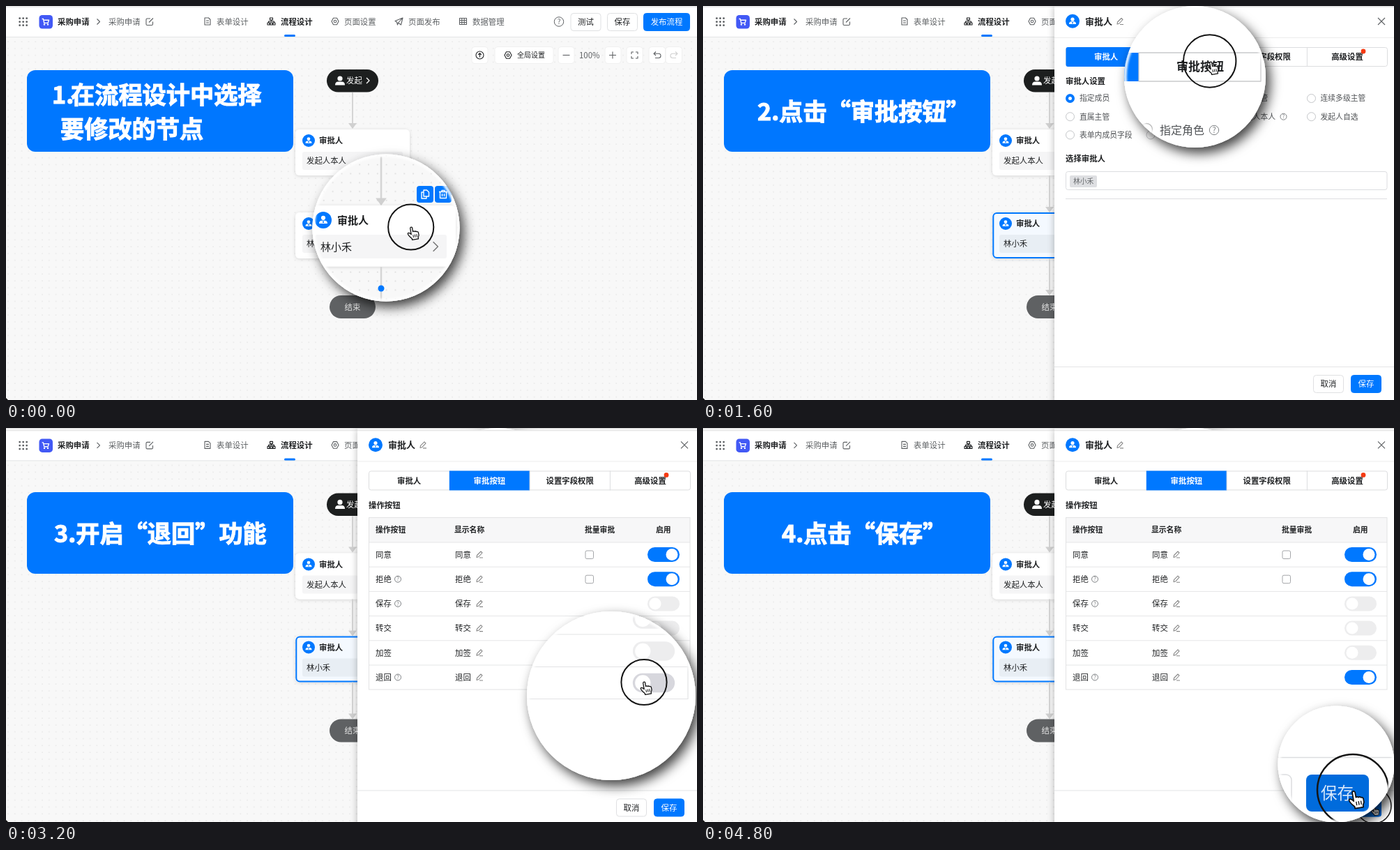
Recreate the animation shown at these times as an HTML page. Size 991 by 565 pixels, loop 6.4 s.

```html
<!DOCTYPE html>
<html lang="zh-CN">
<head>
<meta charset="utf-8">
<style>
html, body { margin: 0; width: 100%; height: 100%; overflow: hidden; background: #f8f8f8 }
svg { display: block; width: 991px; height: 565px }
text { font-family: "Noto Sans CJK SC", "Noto Sans CJK", sans-serif; white-space: pre }
.title text { stroke: #fff; stroke-width: 1.1px }
</style>
</head>
<body>
<svg id="stage" viewBox="0 0 991 565" lang="zh-CN"></svg>
<script>
const BLUE = '#0078ff', INK = '#1f2123', GREY = '#5d6063', PERSON = '林小禾', DY = 2.4;

const text = (x, y, s, c = INK, w = 400, z = 11.4, a = 'start') =>
  `<text x="${x}" y="${y + z * .37}" fill="${c}" font-weight="${w}" font-size="${z}" text-anchor="${a}">${s}</text>`;
const box = (x, y, w, h, r = 0, f = '#fff', s = 'none', more = '') =>
  `<rect x="${x}" y="${y}" width="${w}" height="${h}" rx="${r}" fill="${f}" stroke="${s}" ${more}/>`;
const dot = (x, y, r, f, s = 'none', w = 1) =>
  `<circle cx="${x}" cy="${y}" r="${r}" fill="${f}" stroke="${s}" stroke-width="${w}"/>`;
const path = (d, s = '#ddd', w = 1, f = 'none') =>
  `<path d="${d}" stroke="${s}" stroke-width="${w}" fill="${f}" stroke-linejoin="round"/>`;
const at = (x, y, s, k = 1) => `<g transform="translate(${x} ${y}) scale(${k})">${s}</g>`;
const icon = (x, y, d, c = GREY, k = 1, w = 1.1) => at(x, y, path(d, c, w), k);

const CHEVRON = 'M-2-4L2 0L-2 4';
const PENCIL = 'M-4 4L-3.500 1L2-4.500L4-2.500L-1 3ZM0 4.500H5';
const EDIT = 'M1-4.500H-3.500Q-5-4.500-5-3V3.500Q-5 5-3.500 5H3Q4.500 5 4.500 3.500V0M-1 1L5-5';
const DOC = 'M-4-5H1.500L4-2.500V5H-4ZM-2-1H2M-2 2H2';
const TREE = 'M-2-5H2V-2H-2ZM0-2V0M-4 2V0H4V2M-5.500 2H-2.500V5H-5.500ZM-1.500 2H1.500V5H-1.500ZM2.500 2H5.500V5H2.500Z';
const GEAR = 'M-2.500-4.800H2.500L5 0L2.500 4.800H-2.500L-5 0ZM1.800 0A1.800 1.800 0 1 1-1.800 0A1.800 1.800 0 1 1 1.800 0';
const PLANE = 'M-5.500-.5L5.500-5L3 5L-1 2L-2 5L-3 1ZM-1 2L5.500-5';
const GRID = 'M-5-4.500H5V4.500H-5ZM-5-1.500H5M-5 1.500H5M-1.700-4.500V4.500M1.700-4.500V4.500';
const UP = 'M5.500 0A5.500 5.500 0 1 1-5.500 0A5.500 5.500 0 1 1 5.500 0M0 3V-2.500M-2.300-.5L0-2.800L2.300-.5';
const FULL = 'M-4.500-1.500V-4.500H-1.500M1.500-4.500H4.500V-1.500M4.500 1.500V4.500H1.500M-1.500 4.500H-4.500V1.500';
const UNDO = 'M-2-5L-5-2.200L-2 .5M-5-2.200H2Q5-2.200 5 1Q5 4 2 4H-3';
const COPY = 'M-2-6H2.500L5.500-3V3H-2ZM-2-3H-5V6H2V3';
const BIN = 'M-6-3.500H6M-2-3.500V-5.500H2V-3.500M-4.500-3.500V5.500H4.500V-3.500M-1.500-1V3M1.500-1V3';

const help = (x, y, r = 4.5, z = 7.5, c = '#7d8083') => dot(x, y, r, 'none', c) + text(x, y, '?', c, 400, z, 'middle');
const bust = (x, y, k) => at(x, y, dot(0, -3, 3.6, '#fff') + path('M-7 6.500Q-7 1.500-2.500 1.500H2.500Q7 1.500 7 6.500Z', 'none', 0, '#fff'), k);
const avatar = (x, y, r) => dot(x, y, r, BLUE) + bust(x, y - r * .05, r / 14) + path(`M${x} ${y + r * .12}v${r * .22}`, BLUE, r * .14);
const arrow = (x, y1, y2, k = 1) =>
  path(`M${x} ${y1}V${y2 - 6}`, '#d5d5d5', 2 * k) + path(`M${x - 6 * k} ${y2 - 8 * k}h${12 * k}l${-6 * k} ${8 * k}z`, 'none', 0, '#d0d0d0');
const hand = (x, y, k = 1) => at(x, y, `<g transform="rotate(-10)">` +
  path('M-3 9V7Q-8.500 1-7.500-1.500Q-5.500-2.500-3 1V-7.500Q-3-9.300-1.500-9.300Q0-9.300 0-7.500V-2.500Q1.500-3.500 2.700-2Q4-3 5.300-1.400Q7.500-1.600 7.500 .7V4L6 7V9Z', '#111', 1.3, '#fff') +
  path('M-.5 2V6M2 2V6M4.500 2V6', '#111', 1) + '</g>', k);
const pointer = (x, y, r, hx, hy, k = 1, w = 2) => dot(x, y, r, 'none', '#151515', w) + hand(hx, hy, k);
const toggle = (x, y, on, k = 1, off = '#ededee') =>
  box(x - 23 * k, y - 10.5 * k, 46 * k, 21 * k, 10.5 * k, on ? BLUE : off) + dot(x + (on ? 12 : -12) * k, y, 8.5 * k, '#fff');
const button = (x, y, w, s, main) =>
  box(x + .5, y + .5, w - 1, 25, 4, main || '#fff', main || '#dfe0e2') + text(x + w / 2, y + 13, s, main ? '#fff' : INK, 400, 11.4, 'middle');

let lensId = 0;
const lens = (x, y, r, inner) => {
  const id = 'lens' + lensId++;
  return `<clipPath id="${id}"><circle cx="${x}" cy="${y}" r="${r}"/></clipPath>
    <g filter="url(#deep)">${dot(x, y, r, '#fff')}</g>
    <g clip-path="url(#${id})">${inner}<g filter="url(#soft)">${dot(x, y, r - 1.5, 'none', '#fff', 4)}</g></g>`;
};

const card = (y, name, on) =>
  `<g filter="url(#light)">${box(415, y, 164, 66, 6, on ? '#f4f9ff' : '#fff')}</g>` +
  (on ? box(416.3, y + 1, 162, 64, 5, 'none', BLUE, 'stroke-width="2"') : '') +
  avatar(434, y + 16, 9) + text(449, y + 16, '审批人', INK, 700) +
  box(425, y + 32, 144, 26, 3, on ? '#e8eef4' : '#f5f5f6') + text(431, y + 45, name);

const tool = (x, w) => box(x, 58.5, w, 24, 4, '#fff', '#f0f0f0');

function base(selected) {
  let s = box(0, 0, 991, 570, 0, '#f8f8f8') + box(0, 44, 991, 525, 0, 'url(#dots)') +
    box(0, 0, 991, 44) + path('M0 1H991', '#e2e2e2', 1.5) + path('M0 44.500H991', '#e4e5e6');
  for (let i = 0; i < 9; i++) s += dot(19.7 + i % 3 * 5, 17.7 + (i / 3 | 0) * 5, 1.4, GREY);
  s += box(47.5, 13, 19.5, 19.5, 4.5, '#4259f5') +
    icon(57, 22.5, 'M-6-4.500H-4L-2.500 2H3.500L5-2.500H-3.500', '#fff', .9, 1.5) + dot(55, 26.5, 1.2, '#fff') + dot(60, 26.5, 1.2, '#fff') +
    text(74, 22.5, '采购申请', INK, 700) + icon(132.5, 22.5, CHEVRON) + text(147, 22.5, '采购申请', GREY) + icon(206, 22.5, EDIT);
  const tabs = [[289, DOC, 302, '表单设计'], [380.5, TREE, 394, '流程设计'], [472, GEAR, 485, '页面设置'], [563.5, PLANE, 577, '页面发布'], [655.5, GRID, 669, '数据管理']];
  tabs.forEach(([x, d, tx, name], i) => s += icon(x, 22, d, i == 1 ? INK : GREY) + text(tx, 22.5, name, i == 1 ? INK : GREY, i == 1 ? 700 : 400));
  s += box(399, 41, 16, 3, 1.5, BLUE) + help(793, 22.5, 6.7, 10, GREY) +
    button(809.5, 10, 44, '测试') + button(862, 10, 44, '保存') + button(914, 10, 67, '发布流程', BLUE);
  s += tool(668, 23) + icon(679.5, 70.5, UP, INK) + tool(701, 84) + icon(720, 70.5, GEAR, INK) + text(733, 70.5, '全局设置', INK, 400, 10) +
    tool(792, 23) + icon(803.5, 70.5, 'M-5 0H5') + text(822, 70.5, '100%', GREY) + tool(859, 23) + icon(870, 70.5, 'M-5 0H5M0-5V5') +
    tool(890, 23) + icon(901.5, 70.5, FULL) + tool(922, 23.5) + icon(934, 70.5, UNDO) + tool(946, 23.5) +
    `<g transform="translate(958 70.500) scale(-1 1)">${path(UNDO, '#d0d0d0', 1.1)}</g>`;
  s += box(460, 91, 74, 32.5, 16.2, '#1d1f1f') + bust(479, 107, 1) + text(488, 107, '发起', '#fff') + icon(519, 107, CHEVRON, '#fff', 1, 1.3) +
    arrow(497, 124, 176) + card(177, '发起人本人') + arrow(497, 243, 296) + card(296, PERSON, selected) + arrow(497, 362, 415) +
    box(464, 415, 66, 33, 16.5, '#5f6163') + text(497, 431.7, '结束', '#e6e6e6', 400, 11.4, 'middle');
  return s;
}

function panel(active) {
  let s = `<g filter="url(#side)">${box(504, 1, 500, 580)}</g>` + path('M504 1H991', '#e2e2e2', 1.5) +
    avatar(530, 21.8, 10) + text(548, 21.8, '审批人', INK, 700, 13) + icon(598, 22, PENCIL, '#888') +
    icon(973, 22, 'M-5-5L5 5M5-5L-5 5') + path('M504 45.500H991', '#ececec');
  s += box(520.5, 59.5, 461, 27, 3, '#fff', '#dcdddf');
  ['审批人', '审批按钮', '设置字段权限', '高级设置'].forEach((name, i) => {
    const x = 520.5 + i * 115.3, on = i == active;
    s += (on ? box(x, 59, 115.3, 28, i ? 0 : 3, BLUE) : i ? path(`M${x} 59V87`, '#dcdddf') : '') +
      text(x + 57.6, 73, name, on ? '#fff' : INK, 700, 11.4, 'middle');
  });
  return s + dot(947, 65, 3.4, '#f53a12') + path('M504 517.500H991', '#e4e5e6') +
    button(875, 529, 44, '取消') + button(929, 529, 44, '保存', BLUE);
}

function members() {
  let s = text(520, 108, '审批人设置', INK, 700);
  const cols = [[526.5, 540, ['指定成员', '直属主管', '表单内成员字段']], [642, 655, ['指定角色', '部门主管', '部门字段']],
    [754, 767, ['多级主管', '发起人本人']], [872.5, 885.5, ['连续多级主管', '发起人自选']]];
  cols.forEach(([x, tx, names], c) => names.forEach((name, r) => {
    const y = 132.5 + r * 26.2, on = !c && !r;
    s += dot(x, y, on ? 4.5 : 6, '#fff', on ? BLUE : '#c4c6c9', on ? 4 : 1) + text(tx, y, name, '#505356', 400, 10.8);
  }));
  return s + help(832.5, 158.7) + text(520, 219, '选择审批人', INK, 700) + box(520.5, 237.5, 460.5, 26, 3, '#fff', '#dcdde0') +
    box(526, 243, 39, 17, 2, '#dedfe2') + text(531, 251.5, PERSON, '#65686b', 400, 9.8) + path('M520 276.500H981', '#dedfe1');
}

function table(lastOn) {
  let s = text(520, 110.5, '操作按钮', INK, 700) + box(520.5, 128.5, 460.5, 35.5, 0, '#f7f7f8');
  [[530, '操作按钮'], [643, '显示名称'], [830, '批量审批'], [932, '启用']].forEach(([x, h]) => s += text(x, 146.5, h, INK, 700, 10.8));
  ['同意', '拒绝', '保存', '转交', '加签', '退回'].forEach((name, i) => {
    const y = 181.5 + i * 35.2;
    s += path(`M520 ${y - 17.5}H981`, '#e5e6e7') + text(530, y, name) + text(644, y, name) + icon(679, y, PENCIL, '#888') +
      (i == 1 || i == 2 || i == 5 ? help(562, y) : '') +
      (i < 2 ? box(831, y - 5.5, 11.5, 11.5, 2, '#fff', '#a4a6a9') : '') + toggle(943, y, i < 2 || i == 5 && lastOn);
  });
  return s + box(520.5, 128.5, 460.5, 246.5, 0, 'none', '#e2e3e4');
}

const banner = (...lines) => box(30, 92, 382, 117, 12, '#0077ff') +
  `<g class="title">${lines.map(([x, y, s]) => text(x, y, s, '#fff', 900, 34.2)).join('')}</g>`;
const corner = path('M0 562L3 565H0Z', 'none', 0, '#111');

const nodeLens = lens(545, 318, 105.5,
  box(439, 212, 212, 212, 0, '#f8f8f8') + at(439, 212, box(0, 0, 170, 170, 0, 'url(#dots)'), 1.31) +
  arrow(538, 216, 286, 1.31) + `<g filter="url(#light)">${box(430, 286, 215, 87.5, 7)}</g>` +
  avatar(455, 307, 12) + text(475, 307.5, '审批人', INK, 700, 15) + box(443, 328, 189, 34, 3, '#f5f5f6') +
  text(451, 345, PERSON, INK, 400, 15) + icon(616, 345, CHEVRON, '#777', 1.7, .9) +
  box(589, 258, 24, 24, 4, BLUE) + icon(601, 270, COPY, '#fff', 1, 1.4) + box(615, 258, 24, 24, 4, BLUE) + icon(627, 270, BIN, '#fff', 1, 1.4) +
  path('M538 374V424', '#d5d5d5', 2.5) + dot(538, 405, 4.5, BLUE) + pointer(580.7, 317, 32.6, 584, 326));

const tabLens = lens(705.5, 101.5, 101.5,
  box(600, 67, 25, 41, 0, BLUE) + path('M625 67H800V108H625Z', '#c9cacc', 1.3) + text(679, 87, '审批按钮', INK, 700, 17) +
  dot(636, 177, 8.5, '#fff', '#bbb', 1.5) + text(655, 178, '指定角色', '#505356', 400, 16) + help(733, 178, 6.7, 11) +
  pointer(726.7, 79, 37.7, 731, 89));

const toggleLens = lens(868, 384, 121,
  path('M740 296H978M740 342.500H978M740 388.500H978V260', '#e2e3e4', 1.2) +
  toggle(929, 274, false, 1.31) + toggle(929, 320, false, 1.31) + toggle(929, 365.5, false, 1.31, '#d7d7dd') +
  pointer(915, 364.5, 32.6, 918, 373));

const saveLens = box(929, 531.5, 44, 26, 4, '#006bdc') + pointer(962, 542, 25, 964, 549, .72, 1.5) +
  lens(908, 482, 83.5,
    path('M820 472.500H995', '#dcdddf', 1.5) + box(755, 497, 89, 53, 8, '#fff', '#dcdddf', 'stroke-width="1.5"') +
    box(865, 497, 90, 53, 8, '#006bdc') + text(886, 523.5, '保存', '#d9e8fa', 400, 23.5) + pointer(932, 519, 51, 937, 533, 1.35, 2.5));

// The top 3px stay from the second scene while the page beneath slides down.
const lower = (s, over) => `<g clip-path="url(#below)">${at(0, DY, base(true) + panel(1))}${s}${over}${corner}</g>`;

const scenes = [
  base(false) + banner([66, 127, '1.'], [93, 127, '在流程设计中选择'], [78, 176, '要修改的节点']) + nodeLens + corner,
  base(true) + panel(0) + members() + banner([78, 151, '2.点击“审批按钮”']) + tabLens + corner,
  lower(table(false) + banner([69, 151, '3.开启“退回”功能']), toggleLens),
  lower(table(true) + banner([113, 151, '4.点击“保存”']), saveLens)
];

const shadow = (id, dx, dy, blur, a) =>
  `<filter id="${id}" x="-30%" y="-30%" width="160%" height="160%"><feDropShadow dx="${dx}" dy="${dy}" stdDeviation="${blur}" flood-opacity="${a}"/></filter>`;
const stage = document.getElementById('stage');
stage.innerHTML = `<defs>
  <pattern id="dots" width="9.8" height="9.8" patternUnits="userSpaceOnUse"><circle cx="3" cy="2" r=".65" fill="#d3d3d3"/></pattern>
  <clipPath id="below"><rect y="3" width="991" height="562"/></clipPath>
  <filter id="soft"><feGaussianBlur stdDeviation="1.5"/></filter>
  ${shadow('deep', 6, 8, 8.5, .75)}${shadow('light', 0, 1, 2.5, .14)}${shadow('side', -2, 0, 4, .2)}
</defs>` + scenes.map(s => `<g class="scene">${s}</g>`).join('');

const groups = [...stage.querySelectorAll('.scene')];
function tick() {
  const now = Math.floor(performance.now() % 6400 / 1600);
  groups.forEach((g, i) => g.style.display = i == now || i == 1 && now > 1 ? '' : 'none');
  requestAnimationFrame(tick);
}
tick();
</script>
</body>
</html>
```
